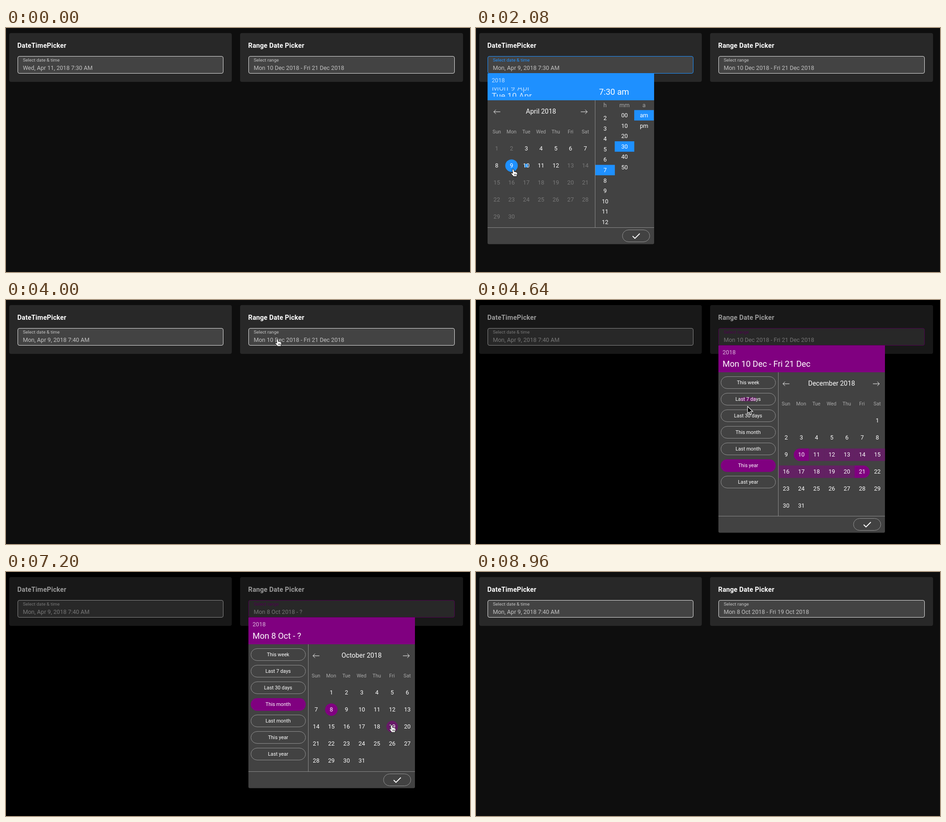
Recreate the animation shown at these times as an HTML page. Size 1003 by 530 pixels, loop 9.28 s.

```html
<!DOCTYPE html>
<html lang="en">
<head>
<meta charset="utf-8">
<title>Date pickers</title>
<style>
  html, body { margin: 0; width: 100%; height: 100%; overflow: hidden; background: #0e0e0e; }
  svg { display: block; width: 1003px; height: 530px; font-family: Roboto, sans-serif; }
  text { white-space: pre; }
</style>
</head>
<body>
<svg id="stage" viewBox="0 0 1003 530" xmlns="http://www.w3.org/2000/svg"></svg>
<script>
const STEP = 160, LOOP = 9280;
const BLUE = '#1e90ff', PURPLE = '#800080', SOFT = '#632163', GREEN = '#008000', BODY = '#424242';
const WEEK = ['Sun', 'Mon', 'Tue', 'Wed', 'Thu', 'Fri', 'Sat'];
const MONTHS = ['April', 'October', 'December'];
const MONTH_INDEX = { April: 3, October: 9, December: 11 };
const PRESETS = ['This week', 'Last 7 days', 'Last 30 days', 'This month', 'Last month', 'This year', 'Last year'];

// The pointer's stops; what a stop sets takes effect one step later.
const stops = [
  { at: 0, x: 143, y: 358, set: { day: 11, minute: 30, month: 'December', from: 10, to: 21, preset: 'This year' } },
  { at: 7, x: 130, y: 79, click: true, opens: 'left' },
  { at: 11, x: 110, y: 306, click: true, set: { day: 10 } },
  { at: 12, x: 80, y: 307, click: true, set: { day: 9 } },
  { at: 17, x: 321, y: 281, click: true, set: { minute: 40 } },
  { at: 20, x: 354, y: 459, click: true, closes: 'left' },
  { at: 26, x: 588, y: 82, click: true, opens: 'right' },
  { at: 29, x: 587, y: 231 },
  { at: 31, x: 588, y: 217, click: true, set: { month: 'October', from: 5, to: 12, preset: 'Last 7 days' } },
  { at: 35, x: 589, y: 276, click: true, set: { from: 1, to: 31, preset: 'This month' } },
  { at: 40, x: 702, y: 300, click: true, set: { from: 8, to: null } },
  { at: 46, x: 834, y: 333, click: true, set: { to: 19 } },
  { at: 49, x: 842, y: 430, set: { preset: null } },
  { at: 54, x: 846, y: 452, click: true, closes: 'right' }
];
const last = stops.at(-1);

const stateAt = k => Object.assign({}, stops[0].set, ...stops.filter(s => s.at < k).map(s => s.set));

function pointAt(k) {
  const i = Math.max(0, stops.findLastIndex(s => s.at <= k));
  const a = stops[i], b = stops[i + 1] || a;
  const u = Math.min(1, Math.max(0, (k - a.at - 1) / Math.max(1, b.at - a.at - 1)));
  const e = 1 - (1 - u) ** 3;
  return { x: a.x + (b.x - a.x) * e, y: a.y + (b.y - a.y) * e, near: [a, b] };
}

function visibility(k, side) {
  const opened = k - stops.find(s => s.opens === side).at;
  const closed = k - stops.find(s => s.closes === side).at;
  if (opened < 1 || closed > 1) return 0;
  return closed === 1 ? .12 : opened === 1 ? .5 : 1;
}

function over(k, x, y, w, h) {
  const p = pointAt(k);
  return Math.abs(p.x - x) <= w / 2 && Math.abs(p.y - y) <= h / 2;
}

const dateOf = (month, day) => {
  const weekday = new Date(2018, MONTH_INDEX[month], day).getDay();
  return { weekday: WEEK[weekday], first: new Date(2018, MONTH_INDEX[month], 1).getDay() };
};
const dayLabel = (month, day, year = '') =>
  day ? `${dateOf(month, day).weekday} ${day} ${month.slice(0, 3)}${year}` : '?';
const rangeLabel = (s, year) => `${dayLabel(s.month, s.from, year)} - ${dayLabel(s.month, s.to, year)}`;

const text = (s, x, y, size, fill = '#fff', extra = '') =>
  `<text x="${x}" y="${y + size * .355}" font-size="${size}" fill="${fill}" ${extra}>${s}</text>`;
const mid = (s, x, y, size, fill) => text(s, x, y, size, fill, 'text-anchor="middle"');
const rect = (x, y, w, h, fill, r = 0, extra = '') =>
  `<rect x="${x}" y="${y}" width="${w}" height="${h}" rx="${r}" fill="${fill}" ${extra}/>`;
const path = (d, stroke = '#fff', width = .95, fill = 'none') =>
  `<path d="${d}" stroke="${stroke}" stroke-width="${width}" fill="${fill}"/>`;

// Background of a choice: grows under the pointer, stays when chosen, shrinks when left.
function glow(k, x, y, w, h, color, now, before, round = true) {
  const hovered = over(k, x, y, w, h);
  const left = before || over(k - 1, x, y, w, h);
  const scale = now ? 1 : hovered ? .93 : left ? .3 : 0;
  if (!scale) return '';
  const sw = w * scale, sh = h * scale;
  return rect(x - sw / 2, y - sh / 2, sw, sh, color, round ? sh / 2 : 0,
    `fill-opacity="${now || before ? 1 : .6}"`);
}

const ringed = (x, y, w, h) => rect(x - w / 2 + .5, y - h / 2 + .5, w - 1, h - 1, 'none', h / 2, 'stroke="#929292"');

function card(x, w, title, label, value, color, focused) {
  return rect(x, 11, w, 106, '#282828', 4) +
    text(title, x + 17.6, 38, 14.4, '#fff', 'font-weight="700" letter-spacing=".13"') +
    rect(x + 18.5, 61.5, w - 37, 37, '#434343', 3.5, `stroke="${focused ? color : '#e0e0e0'}"`) +
    text(label, x + 29.4, 69.8, 9.9, focused ? color : '#c4c4c4') +
    text(value, x + 29.4, 86.6, 12.6, '#c2c2c2');
}

// Header line: on a change the old and new values roll past each other.
function rolling(x, now, before, forward) {
  if (now === before) return text(now, x, 139, 18);
  const shift = forward ? 9 : -9;
  return '<g clip-path="url(#line)">' +
    text(now, x, 139 + shift, 18, '#fff', 'opacity=".6"') +
    text(before, x, 139 - shift, 18, '#fff', 'opacity=".8"') + '</g>';
}

const monthBar = (title, left, center, right) =>
  mid(title, center, 181, 14.4) +
  path(`M${left + 14} 182H${left}m4.5-4.5l-4.5 4.5l4.5 4.5`) +
  path(`M${right - 14} 182H${right}m-4.5-4.5l4.5 4.5l-4.5 4.5`);

const weekdays = (x, gap) => WEEK.map((w, i) => mid(w, x + i * gap, 225.5, 10.8, '#a8a8a8')).join('');

const checkButton = (k, x, y) =>
  (over(k, x, y, 60, 27) ? '' : ringed(x, y, 60, 27)) +
  glow(k, x, y, 60, 27, GREEN) +
  path(`M${x - 7.5} ${y + .5}l5 5l10.5-10.5`, '#fff', 1.8);

const shell = (x, bottom, color) =>
  rect(x, 120, 360, bottom - 120, BODY, 3) + rect(x, 98.6, 360, 58.4, color) +
  text('2018', x + 9, 113.5, 12.6, '#fff', 'opacity=".72"');

const popup = (show, body) => show
  ? `<g opacity="${show}" transform="translate(0 ${show < 1 ? -15.7 : 0})">${body}</g>` : '';

function timeColumn(k, x, head, items, y, now, before) {
  return mid(head, x, 168, 12.6, '#a8a8a8') + items.map((s, i) => {
    const cy = y + i * 22.6;
    return glow(k, x, cy, 42.3, 22.6, BLUE, s === now, s === before, false) + mid(s, x, cy, 12.6);
  }).join('');
}

function dateTimePicker(k, s, old) {
  const hours = Array.from({ length: 11 }, (_, i) => i + 2);
  const minutes = Array.from({ length: 6 }, (_, i) => i ? i * 10 : '00');
  let out = shell(25, 469.6, BLUE) +
    rolling(34, dayLabel('April', s.day), dayLabel('April', old.day), s.day > old.day) +
    rolling(266, `7:${s.minute} am`, `7:${old.minute} am`, s.minute > old.minute) +
    monthBar('April 2018', 38.5, 140.5, 240.5) + weekdays(44.9, 31.9);
  for (let d = 1; d <= 30; d++) {
    const x = 44.9 + (d - 1) % 7 * 31.9, y = 262 + Math.floor((d - 1) / 7) * 36.9;
    const enabled = d > 2 && d < 13;
    if (enabled) out += glow(k, x, y, 27, 27, BLUE, d === s.day, d === old.day);
    out += mid(d, x, y, 12.6, enabled ? '#fff' : '#777');
  }
  return out +
    timeColumn(k, 279, 'h', hours, 195.6, 7, 7) +
    timeColumn(k, 321, 'mm', minutes, 189.6, s.minute, old.minute) +
    timeColumn(k, 363.2, 'a', ['am', 'pm'], 189.6, 'am', 'am') +
    path('M257.5 157V433.5M25 433.5H385', '#888', 1) +
    checkButton(k, 346, 451.5);
}

function rangeDays(k, s, first) {
  const w = 230 / 7, cap = w - 13.5;
  let out = '';
  for (let d = 1; d <= 31; d++) {
    const n = d - 1 + first, left = 654 + n % 7 * w, x = left + w / 2;
    const y = 262 + Math.floor(n / 7) * 36.9, top = y - 13.2;
    if (d === s.from && !s.to) out += glow(k, x, y, 27, 27, PURPLE, true);
    else if (d === s.from) out += path(`M${left + w} ${top}h${-cap}a13.5 13.5 0 0 0 0 27h${cap}z`, 'none', 0, PURPLE);
    else if (d === s.to) out += path(`M${left} ${top}h${cap}a13.5 13.5 0 0 1 0 27h${-cap}z`, 'none', 0, PURPLE);
    else if (d > s.from && d < s.to) out += rect(left, top, w + .2, 27, SOFT);
    else out += glow(k, x, y, 27, 27, PURPLE);
    out += mid(d, x, y, 12.6);
  }
  return out;
}

function rangePicker(k, s, old) {
  const first = dateOf(s.month, 1).first;
  const extra = (Math.ceil((first + 31) / 7) - 5) * 36;
  const forward = MONTHS.indexOf(s.month) >= MONTHS.indexOf(old.month) && s.from >= old.from;
  let out = shell(524, 469.6 + extra, PURPLE) +
    rolling(533, rangeLabel(s), rangeLabel(old), forward) +
    monthBar(s.month + ' 2018', 663.5, 768.7, 872) + weekdays(670, 32.86);
  PRESETS.forEach((name, i) => {
    const y = 179.4 + i * 36, chosen = name === s.preset;
    if (!chosen && !over(k, 588.5, y, 119, 27)) out += ringed(588.5, y, 119, 27);
    out += glow(k, 588.5, y + .3, 119, 27.5, PURPLE, chosen, name === old.preset) + mid(name, 588.2, y, 10.8);
  });
  return out + rangeDays(k, s, first) +
    path(`M653.5 157V${433.5 + extra}M524 ${433.5 + extra}H884`, '#888', 1) +
    checkButton(k, 845.5, 451.5 + extra);
}

const ARROW = path('M0 0V15.5L3.7 12.2L6.2 18L8.7 17L6.3 11.3H11.4Z', '#fff', 1.1, '#000');
const HAND = path('M-1.7 1Q-1.7-.6 0-.6Q1.4-.6 1.7 1L2.6 5.2Q4 4.3 5 5.6Q6.6 5 7.2 6.6Q9 6 9.4 8V11L8.4 13V15.5H.6L-.2 13.8L-3.7 9.8Q-4.6 8-3.2 7.6Q-1.9 7.6-.6 9Z', '#000', .9, '#fff') +
  path('M3 9.5V13M5 9.5V13M7 9.5V13', '#000', .8);
const RING = '<circle r="30" fill="none" stroke="#000" stroke-opacity=".7" stroke-width="3"/>' +
  '<circle r="30" fill="none" stroke="#fff" stroke-opacity=".75" stroke-width="1.1"/>';

function cursor(k) {
  if (k < 1 || k > last.at) return '';
  const p = pointAt(k);
  const aiming = p.near.some(s => s.click && Math.hypot(s.x - p.x, s.y - p.y) < 12);
  const clicking = stops.some(s => s.at === k && s.click);
  return `<g transform="translate(${p.x} ${p.y})">${clicking ? RING : ''}${aiming ? HAND : ARROW}</g>`;
}

function scene(k) {
  const s = stateAt(k), old = stateAt(k - 1);
  const left = visibility(k, 'left'), right = visibility(k, 'right');
  return '<clipPath id="line"><rect y="129" width="1003" height="20"/></clipPath>' +
    rect(0, 0, 1003, 530, right === 1 ? '#000' : '#0e0e0e') +
    card(7, 481, 'DateTimePicker', 'Select date &amp; time',
      `${dateOf('April', s.day).weekday}, Apr ${s.day}, 2018 7:${s.minute} AM`, BLUE, left >= .5) +
    card(506, 482, 'Range Date Picker', 'Select range', rangeLabel(s, ' 2018'), PURPLE, right >= .5) +
    popup(left, dateTimePicker(k, s, old)) +
    rect(0, 0, 1003, 530, '#000', 0, `opacity="${right * .4}"`) +
    popup(right, rangePicker(k, s, old)) +
    cursor(k);
}

const stage = document.getElementById('stage'), start = performance.now();
let shown = -1;
function tick() {
  const k = Math.floor((performance.now() - start) % LOOP / STEP);
  if (k !== shown) stage.innerHTML = scene(shown = k);
  requestAnimationFrame(tick);
}
tick();
</script>
</body>
</html>
```
